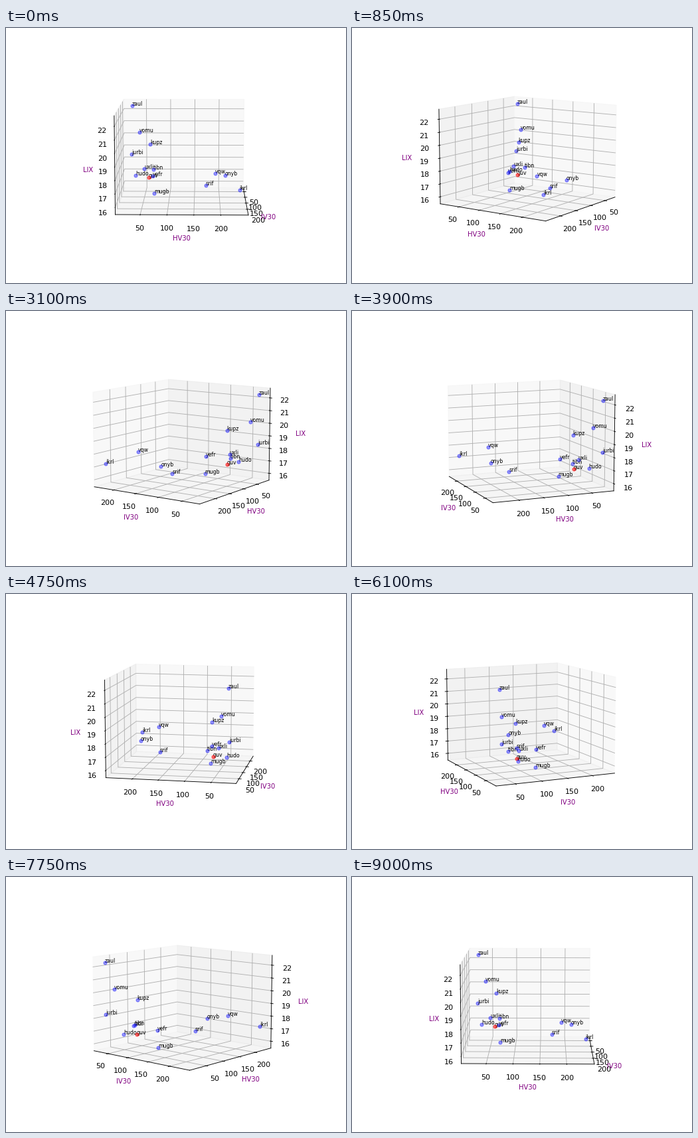
Write a matplotlib script that moves like this. It is 512 px wide and 384 px high and loops after 9.05 s.

```python
import matplotlib.pyplot as plt
from matplotlib.animation import FuncAnimation

FRAMES = 181
STEP = 2      # degrees per frame
START = 1
ELEV = 10

# label, IV30, HV30, LIX
POINTS = [
    ("zaul", 28.0, 21.6, 22.30),
    ("vomu", 37.0, 36.5, 20.20),
    ("kupz", 74.1, 60.0, 19.47),
    ("jurbi", 30.3, 20.0, 18.33),
    ("uxli", 75.4, 47.8, 17.50),
    ("tibn", 62.1, 66.4, 17.35),
    ("yefr", 117.0, 67.2, 17.27),
    ("hudo", 65.5, 29.7, 16.87),
    ("guv", 74.8, 57.2, 16.79),
    ("mugb", 116.7, 69.8, 15.91),
    ("srif", 123.5, 172.5, 16.58),
    ("vqw", 188.3, 189.8, 18.07),
    ("onyb", 122.6, 210.7, 17.40),
    ("ikrl", 230.9, 235.2, 17.20),
]
HIGHLIGHT = "guv"

fig = plt.figure(figsize=(6.4, 4.8), dpi=80)
ax = fig.add_subplot(projection="3d")

for name, iv, hv, lix in POINTS:
    marked = name == HIGHLIGHT
    ax.scatter([iv], [hv], [lix], s=20, c="red" if marked else "blue",
               alpha=0.55 if marked else 0.4, depthshade=False)
    ax.text(iv, hv, lix, name, fontsize=7)

ax.set_xlim(13.5, 245.5)
ax.set_ylim(3.5, 251.4)
ax.set_zlim(15.45, 22.77)
ax.set_xticks(range(50, 201, 50))
ax.set_yticks(range(50, 201, 50))
ax.set_zticks(range(16, 23))

label_style = dict(fontsize=9, color="purple")
ax.set_xlabel("IV30", **label_style)
ax.set_ylabel("HV30", **label_style)
ax.set_zlabel("LIX", **label_style)


def rotate(i):
    ax.view_init(elev=ELEV, azim=START + STEP * i)
    return []


rotate(0)
anim = FuncAnimation(fig, rotate, frames=FRAMES, interval=50,
                     repeat=True, repeat_delay=0, blit=False)
plt.show()
```
